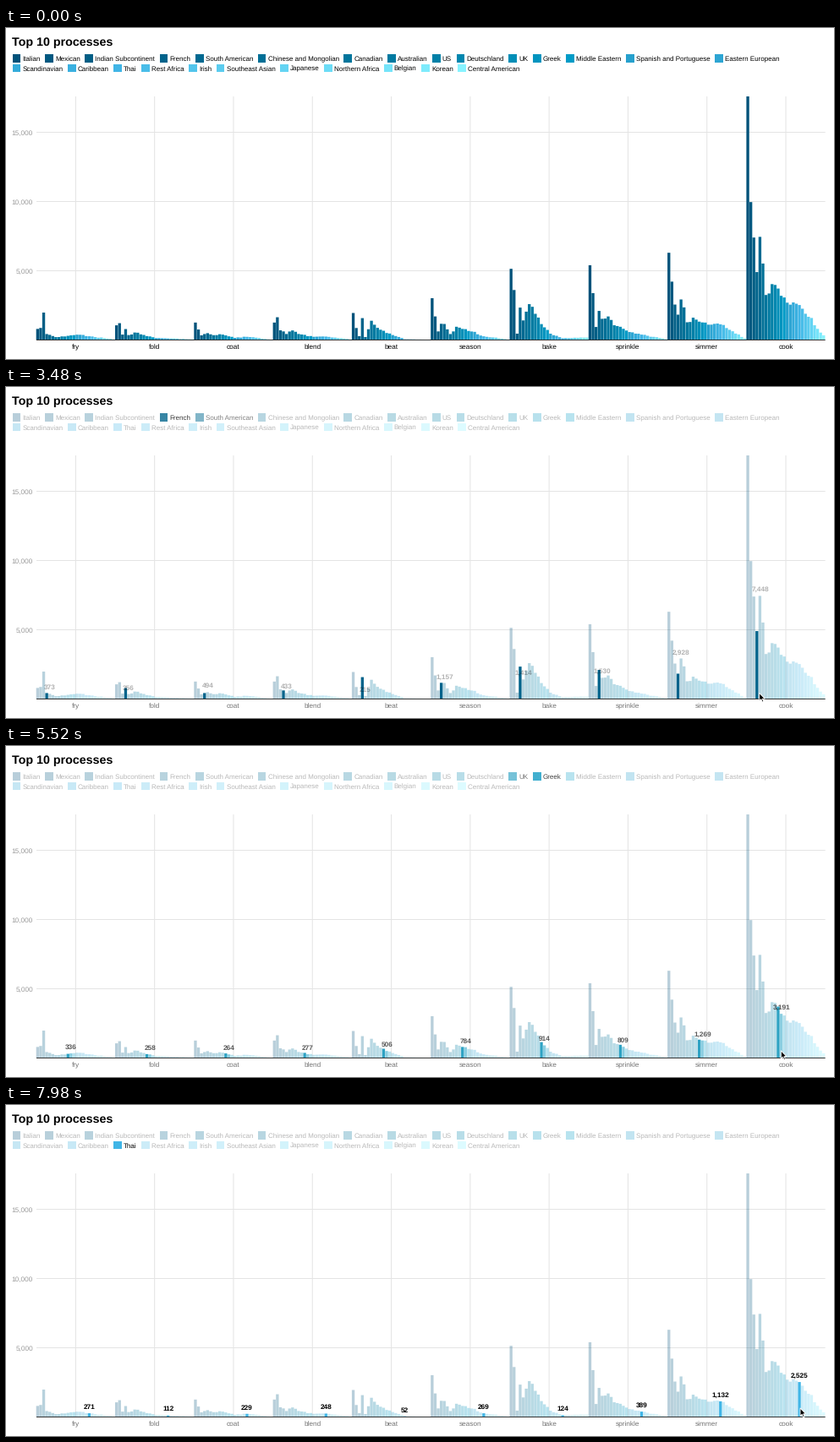
A matplotlib script for the animation above (8000 ms loop, 979 by 392 pixels).

```python
import numpy as np
import matplotlib.pyplot as plt
from matplotlib.animation import FuncAnimation
from matplotlib.collections import PolyCollection
from matplotlib.patches import Polygon, Rectangle

plt.rcParams["font.family"] = "Liberation Sans"
plt.rcParams["text.hinting"] = "none"

W, H, DPI = 979, 392, 64
FRAMES, STEP = 320, 25
LEFT, RIGHT, TOP, BASE = 35.7, 968.7, 81, 369.5
SERIES = 26
GROUP = (RIGHT - LEFT) / 10
BAR = GROUP / SERIES
COOK = RIGHT - GROUP
DIM, FADE, LAG = 0.28, 150, 60

ROWS = [
    "Italian|Mexican|Indian Subcontinent|French|South American|"
    "Chinese and Mongolian|Canadian|Australian|US|Deutschland|UK|Greek|"
    "Middle Eastern|Spanish and Portuguese|Eastern European",
    "Scandinavian|Caribbean|Thai|Rest Africa|Irish|Southeast Asian|Japanese|"
    "Northern Africa|Belgian|Korean|Central American",
]

# Counts at a few series; the ones between are interpolated with a wobble
KNOTS = [0, 1, 2, 3, 4, 6, 8, 13, 17, 25]
COUNTS = {
    "fry": [800, 870, 1980, 430, 373, 210, 260, 384, 271, 50],
    "fold": [1060, 1215, 390, 790, 356, 540, 408, 132, 112, 50],
    "coat": [1260, 757, 340, 430, 494, 350, 418, 153, 229, 30],
    "blend": [1260, 1643, 700, 620, 433, 690, 435, 233, 248, 50],
    "beat": [1950, 865, 280, 1580, 215, 1390, 878, 358, 52, 30],
    "season": [3020, 1702, 620, 1170, 1157, 430, 957, 615, 269, 40],
    "bake": [5140, 3610, 460, 2340, 1414, 2590, 1891, 457, 124, 180],
    "sprinkle": [5400, 3384, 940, 2100, 1530, 1700, 1065, 577, 389, 60],
    "simmer": [6300, 4215, 2560, 1830, 2928, 1280, 1612, 1107, 1132, 110],
    "cook": [17590, 9960, 7400, 4905, 7448, 3250, 4035, 2697, 2525, 340],
}

# Pointer position inside the last group, measured in bars
PATH_T = [780, 1230, 2200, 2735, 2850, 3430, 3810, 4320, 4690, 5760,
          6540, 7700, 7980]
PATH_K = [-1.2, 0.8, 1, 2, 3, 4, 5, 8, 9, 12, 13, 17, 17.6]
STARTS = [1415, *np.interp(range(1, 18), PATH_K, PATH_T)]
ARROW = np.array([(0, 0), (0, 9.3), (2.1, 7.4), (3.6, 10.8),
                  (5.1, 10.2), (3.7, 6.9), (6.5, 6.7)])

COLOURS = np.column_stack([
    np.interp(range(SERIES), [0, 8, 12, 13, 17, 25], channel)
    for channel in ([0, 0, 0, 38, 64, 135],
                    [82, 128, 155, 160, 181, 243],
                    [122, 167, 199, 205, 230, 255])]) / 255


def fill_in(known, rng):
    wobble = rng.uniform(0.87, 1.13, SERIES)
    wobble[KNOTS] = 1
    return np.rint(np.interp(range(SERIES), KNOTS, known) * wobble).astype(int)


rng = np.random.default_rng(3)
counts = np.array([fill_in(known, rng) for known in COUNTS.values()])


def bar_top(count):
    return BASE - count * 82 / 5000


def px(size):
    return size * 72 / DPI


fig = plt.figure(figsize=(W / DPI, H / DPI), dpi=DPI, facecolor="white")
ax = fig.add_axes([0, 0, 1, 1])
ax.set_xlim(0, W)
ax.set_ylim(H, 0)
ax.axis("off")


def write(x, y, text, size=8.1, **kw):
    return ax.text(x, y, text, fontsize=px(size), va="baseline", **kw)


def rule(xs, ys, colour, z=0):
    ax.plot(xs, ys, color=colour, lw=px(1), zorder=z,
            solid_capstyle="butt", snap=False)


write(7.3, 21, "Top 10 processes", 14.3, weight="bold")

swatches, names = [], []
for r, row in enumerate(ROWS):
    x, y = 7.5, 36 + 11.5 * r
    for name in row.split("|"):
        box = Rectangle((x, y - 4.8), 9.6, 9.6, lw=0, fc=COLOURS[len(names)])
        swatches.append(ax.add_patch(box))
        label = write(x + 11.8, y + 3, name, 8.05)
        names.append(label)
        x += 17.4 + label.get_window_extent().width

for count in (5000, 10000, 15000):
    y = bar_top(count)
    rule([36, RIGHT], [y, y], "#e4e4e4")
    write(32, y + 3, f"{count:,}", 8.2, ha="right", color="#9a9a9a")

quads, ticks = [], []
for g, name in enumerate(COUNTS):
    x0 = LEFT + g * GROUP
    mid = x0 + GROUP / 2
    rule([mid, mid], [TOP, BASE], "#e4e4e4")
    ticks.append(write(mid, 380.3, name, 8.3, ha="center"))
    for i, top in enumerate(bar_top(counts[g])):
        a = x0 + i * BAR
        b = a + BAR * 0.93
        quads.append([(a, BASE), (a, top), (b, top), (b, BASE)])

bars = PolyCollection(quads, linewidths=0, edgecolors="none", zorder=2,
                      snap=False)
ax.add_collection(bars, autolim=False)
rule([36, RIGHT], [BASE, BASE], "#333333", 3)

values = [write(0, 0, "", 8.2, ha="center", weight="bold", zorder=4)
          for _ in COUNTS]
pointer = Polygon(ARROW, closed=True, fc="black", ec="white", lw=px(0.9),
                  joinstyle="round", zorder=6)
ax.add_patch(pointer)


def levels(t):
    """Opacity of every series, fading towards the hovered one."""
    level = np.ones(SERIES)
    for k, (start, end) in enumerate(zip(STARTS, [*STARTS[1:], np.inf])):
        if t <= start:
            break
        goal = np.full(SERIES, DIM)
        goal[k] = 1
        level += (goal - level) * min((min(t, end) - start) / FADE, 1)
    return level


def show_values(t):
    k = sum(t > s for s in STARTS) - 1
    for g, label in enumerate(values):
        label.set_visible(k >= 0)
        if k >= 0:
            label.set_text(f"{counts[g, k]:,}")
            label.set_position((LEFT + g * GROUP + (k + 0.5) * BAR,
                                bar_top(counts[g, k]) - 5.2))
            label.set_alpha(min((t - STARTS[k]) / FADE, 1))


def draw(n):
    t = n * STEP
    for box, name, level in zip(swatches, names, levels(t)):
        box.set_alpha(level)
        name.set_alpha(level)
    shades = np.column_stack([COLOURS, levels(t - LAG)])
    bars.set_facecolor(np.tile(shades, (len(COUNTS), 1)))
    for tick in ticks:
        tick.set_alpha(1 - 0.45 * np.clip((t - STARTS[0]) / FADE, 0, 1))
    show_values(t)
    tip_x = COOK + BAR * np.interp(t, PATH_T, PATH_K) + 0.5
    tip_y = np.interp(t, [780, 1230, 7980], [396, 364, 359])
    pointer.set_xy(ARROW + (tip_x, tip_y))
    return []


anim = FuncAnimation(fig, draw, frames=FRAMES, interval=STEP,
                     repeat=True, repeat_delay=0, blit=False)
plt.show()
```
